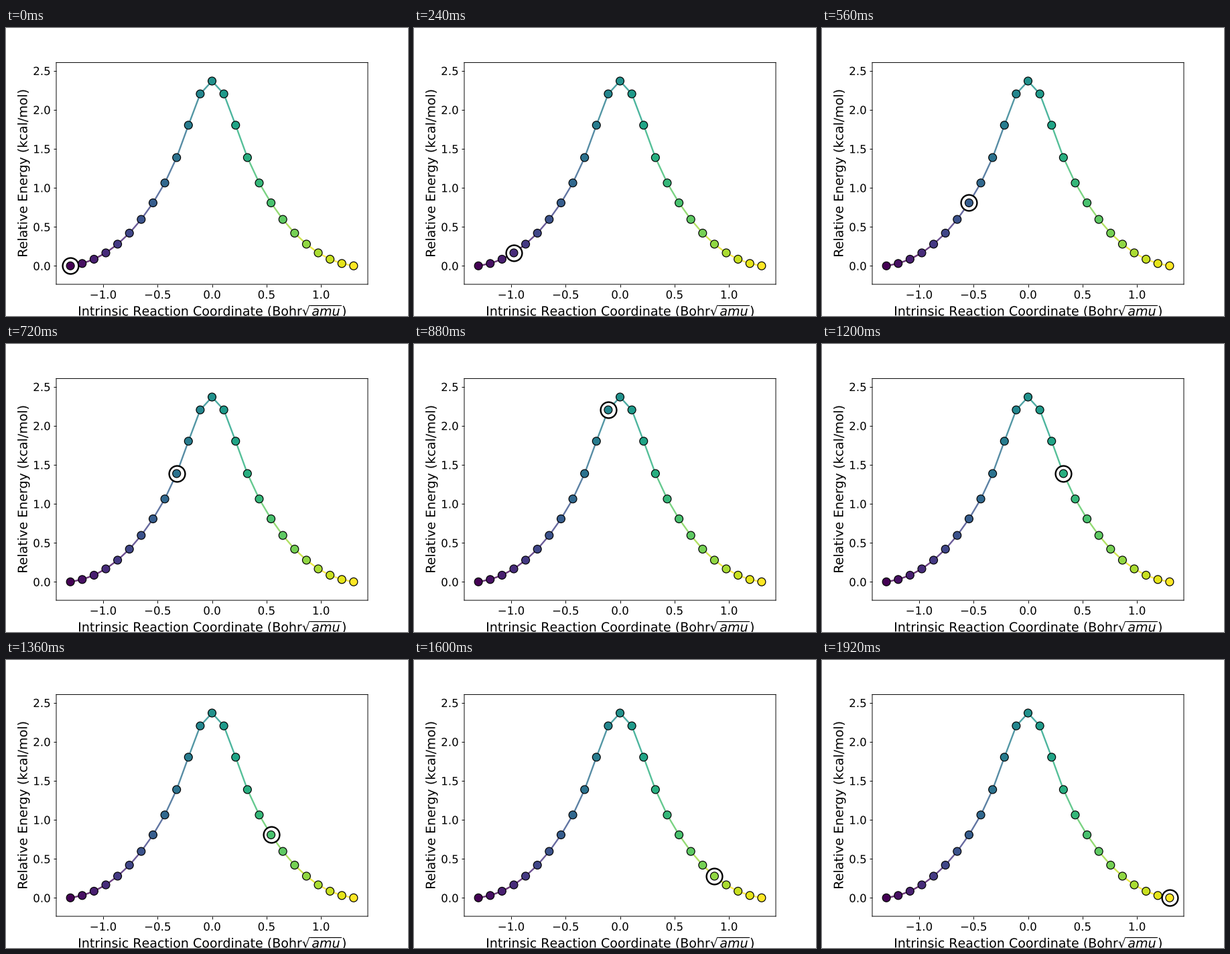
Animation, 600 px wide and 429 px high, one loop 2 s. Source, as a matplotlib script:

```python
import numpy as np
import matplotlib.pyplot as plt
from matplotlib.animation import FuncAnimation
from matplotlib.collections import LineCollection
from matplotlib.patheffects import Normal

plt.rcParams.update({
    "font.family": "DejaVu Sans",
    "font.size": 14,
    "axes.labelsize": 16,
    "text.hinting": "none",
    "path.snap": False,
})

W, H, DPI = 600, 429, 600 / 7
STEP_MS = 80

# Symmetric energy profile: one flank up to the barrier, then mirrored
flank = [0, 0.030, 0.085, 0.166, 0.278, 0.419, 0.595, 0.807,
         1.062, 1.387, 1.802, 2.203, 2.3677]
energy = np.array(flank + flank[-2::-1])
coord = np.linspace(-1.3, 1.3, len(energy))
points = np.column_stack([coord, energy])
n = len(points)

# The small margin keeps the pixel size from being truncated
fig, ax = plt.subplots(figsize=((W + 0.01) / DPI, (H + 0.01) / DPI), dpi=DPI)
fig.subplots_adjust(left=0.125, right=0.9, bottom=0.11, top=0.88)

cmap = plt.get_cmap("viridis")
segments = np.stack([points[:-1], points[1:]], axis=1)
# The line runs through the colours from -1 to 1, the dots over the full range
curve = LineCollection(segments, array=segments[:, :, 0].mean(axis=1),
                       cmap=cmap, norm=plt.Normalize(-1, 1),
                       linewidths=2, alpha=0.8, zorder=1)
ax.add_collection(curve)
ring = ax.scatter(coord[:1], energy[:1], s=400, facecolors="white",
                  edgecolors="black", linewidths=2, zorder=2)
ax.scatter(coord, energy, s=100, c=coord, cmap=cmap,
           edgecolors="black", linewidths=1, zorder=3)

peak = energy.max()
ax.set_xlim(-1.43, 1.43)
ax.set_ylim(-0.1 * peak, 1.1 * peak)
ax.set_xticks(np.arange(-1, 1.1, 0.5))
ax.set_yticks(np.arange(0, 2.6, 0.5))
ax.set_xlabel(r"Intrinsic Reaction Coordinate (Bohr$\sqrt{amu}$)", labelpad=2.8)
ax.set_ylabel("Relative Energy (kcal/mol)")

# Draw text as outlines, so glyphs keep their subpixel positions
for axis in (ax.xaxis, ax.yaxis):
    for text in [axis.label, *axis.get_ticklabels()]:
        text.set_path_effects([Normal()])


def update(i):
    ring.set_offsets(points[i:i + 1])
    return (ring,)


anim = FuncAnimation(fig, update, frames=n, interval=STEP_MS,
                     repeat=True, repeat_delay=0, blit=False)
plt.show()
```
